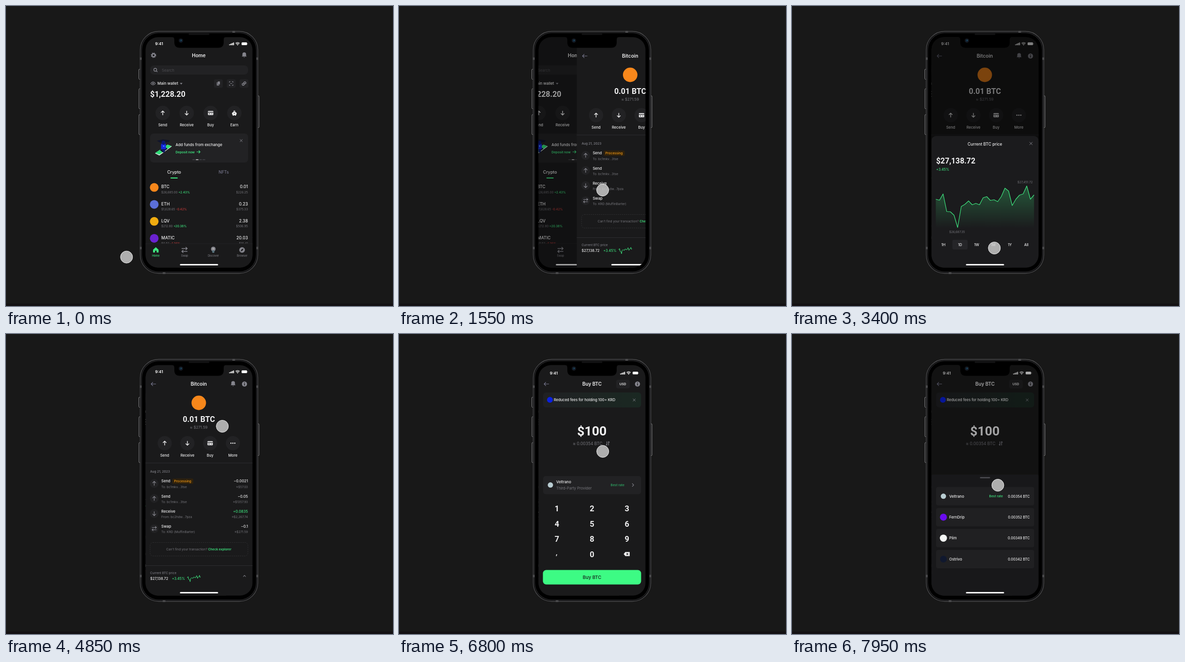
Animation, 800 px wide and 621 px high, one loop 8000 ms. Source, as an HTML page:

```html
<!DOCTYPE html>
<html lang="en">
<head>
<meta charset="utf-8">
<title>Wallet walkthrough</title>
<style>
html, body { margin: 0; height: 100%; overflow: hidden; background: #181818; }
svg { display: block; width: 100vw; height: 100vh; }
text { font-family: Inter, Roboto, sans-serif; white-space: pre; }
.big { font-family: Roboto, "Noto Sans", sans-serif; }
</style>
</head>
<body>
<svg id="stage" viewBox="0 0 800 621"></svg>
<script>
const WHITE = '#f0f0f1', GREY = '#76767c', MID = '#85858d', GREEN = '#3ee67f', CARD = '#222224', PAGE = '#1a1a1b';

// Drawing helpers
const rect = (x, y, w, h, r = 0, fill = CARD, more = '') =>
  `<rect x="${x}" y="${y}" width="${w}" height="${h}" rx="${r}" fill="${fill}" ${more}/>`;
const dot = (x, y, r, fill = CARD, more = '') => `<circle cx="${x}" cy="${y}" r="${r}" fill="${fill}" ${more}/>`;
const line = (d, color = MID, w = 1, more = '') =>
  `<path d="${d}" fill="none" stroke="${color}" stroke-width="${w}" stroke-linejoin="round" ${more}/>`;
const shape = (d, fill) => `<path d="${d}" fill="${fill}"/>`;
const text = (x, y, s, size = 7.7, fill = WHITE, weight = 500, anchor = 'start') =>
  `<text class="${size > 14 ? 'big' : ''}" x="${x}" y="${y}" font-size="${size}" fill="${fill}" font-weight="${weight}" text-anchor="${anchor}">${s}</text>`;
const mid = (x, y, s, size, fill, weight) => text(x, y, s, size, fill, weight, 'middle');
const end = (x, y, s, size, fill, weight) => text(x, y, s, size, fill, weight, 'end');
const span = (s, fill, weight = 500) => `<tspan fill="${fill}" font-weight="${weight}">${s}</tspan>`;
const group = (id, body) => `<g id="${id}">${body}</g>`;

// Icons
const up = (x, y, c = WHITE, w = 1.4) => line(`M${x} ${y + 4.5}v-8.5m-3.6 3.3l3.6-3.6 3.6 3.6`, c, w);
const down = (x, y, c = WHITE, w = 1.4) => line(`M${x} ${y - 4.5}v8.5m-3.6-3.3l3.6 3.6 3.6-3.6`, c, w);
const swap = (x, y, c = MID, k = 1) =>
  `<g transform="translate(${x} ${y}) scale(${k})">${line('M-5-2.5H4M2-5L4.7-2.5 2 0M5 2.5H-4M-2 0L-4.7 2.5-2 5', c, 1.2)}</g>`;
const cross = (x, y, s = 2.6) => line(`M${x - s} ${y - s}l${2 * s} ${2 * s}m0 ${-2 * s}l${-2 * s} ${2 * s}`, MID, 1);
const card = (x, y) => rect(x - 5.5, y - 4.2, 11, 8.4, 1, WHITE) + rect(x - 5.5, y - 2.2, 11, 1.5, 0, CARD) +
  rect(x - 3.8, y + 1, 3, 1.3, 0, CARD) + rect(x + 1.5, y + 1, 2, 1.3, 0, CARD);
const more = (x, y) => [-4, 0, 4].map(d => dot(x + d, y, 1.3, WHITE)).join('');
const pig = (x, y) => dot(x, y - 3.5, 1.8, WHITE) +
  shape(`M${x - 5} ${y + 1}q1-3.5 5-3.5t5 3.5l-1 2.5-1 2h-2v-1h-2v1h-2l-1-2z`, WHITE) + dot(x, y - 3.5, .7, CARD) + dot(x, y + .8, .9, CARD);
const bell = (x, y) => shape(`M${x - 5} ${y + 3}l1.2-1.6v-3a3.8 3.8 0 0 1 7.6 0v3l1.2 1.6zM${x - 1.5} ${y + 4}h3q-1.5 2.2-3 0z`, MID);
const info = (x, y) => dot(x, y, 5.3, MID) + rect(x - .8, y - .7, 1.6, 3.6, 0, PAGE) + dot(x, y - 2.4, .9, PAGE);
const back = y => line(`M310 ${y}h-10m3.8-3.8l-3.8 3.8 3.8 3.8`, '#74748a', 1.2);
const bar = rect(359.5, 533.9, 79, 3, 1.5, '#f4f4f4');
const page = rect(288, 64, 222, 478, 0, PAGE);
const dim = id => rect(288, 64, 222, 478, 0, '#000', `id="${id}" opacity="0"`);

const status = (dx = 0, dy = 0) => mid(316.5 + dx, 81.3 + dy, '9:41', 8.2, '#fff', 600) +
  `<g transform="translate(${-dx * 1.15} ${dy})">` +
  [0, 1, 2, 3].map(i => rect(461.3 + i * 2.7, 79.2 - i * 1.2, 1.9, 2 + i * 1.2, .4, '#fff')).join('') +
  line('M474.6 77.2q4.1-3.4 8.2 0M476 79q2.7-2.1 5.4 0', '#fff', 1.2) + dot(478.7, 80.4, 1, '#fff') +
  rect(487, 75.3, 11.3, 5.7, 1.6, '#fff') + rect(499, 77.2, .7, 2, .3, '#999') + '</g>';

const actions = (xs, y, names, icons, r) => xs.map((x, i) =>
  dot(x, y, r) + icons[i](x, y) + mid(x, y + 27.8, names[i], 7.6)).join('');

// Home screen
const coins = [
  ['BTC', '$26,685.00', '+2.43%', '0.01', '$226.25', '#f7871b'],
  ['ETH', '$1,628.65', '-0.42%', '0.23', '$375.33', '#5b6fd8'],
  ['LQV', '$212.80', '+20.38%', '2.38', '$506.95', '#f0ac10'],
  ['MATIC', '$0.52', '-1.36%', '20.03', '$10.41', '#6a22d0']
];
const coinRows = coins.map(([name, price, change, amount, value, color], i) => {
  const y = 375.6 + i * 35.1;
  return dot(306.4, y, 9, color) + text(321, y + 1.8, name, 8.7) +
    text(321, y + 12.6, price + ' ' + span(change, change[0] == '+' ? GREEN : '#c23a3a'), 6.2, GREY, 400) +
    end(500, y + 1.8, amount, 8.5) + end(500, y + 12.6, value, 6.2, GREY, 400);
}).join('');

const gear = dot(305, 102, 3.2, 'none', `stroke="${MID}" stroke-width="2.4"`) +
  dot(305, 102, 4.8, 'none', `stroke="${MID}" stroke-width="1.6" stroke-dasharray="1.9 1.87"`);
const tools = [439, 465.5, 492].map(x => rect(x - 9, 151.8, 18, 17.4, 3)).join('') +
  rect(435.7, 158, 5, 6.5, .6, MID) + rect(437.5, 156, 5, 6.5, .6, MID, `stroke="${CARD}" stroke-width=".6"`) +
  line('M461.8 158.5v-2h2m3.4 0h2v2m0 4v2h-2m-3.4 0h-2v-2M463.5 160.5h4', MID, 1.1) +
  dot(490.3, 162, 2.1, 'none', `stroke="${MID}" stroke-width="1.5"`) + dot(493.8, 159, 2.1, 'none', `stroke="${MID}" stroke-width="1.5"`);
const art = shape('M308 305l26-18 9 3.5-26 19z', '#dfe6e8') + shape('M308.5 304l25.5-17 8 3-25 17.5z', '#2fdc77') +
  shape('M318 298l10-6.5 6 4-10 7.5z', '#0d1030') +
  shape('M312 279l12-3 15 2-3 4-17 1z', '#10142c') +
  rect(320.5, 284, 10, 14, 4, '#1426e0') + dot(325.5, 283, 4, '#0c1670') + shape('M322 296h7l-1 7h-3z', '#101a6a') + dot(326, 290, 1.3, '#4fa8f0');
const nav = rect(288, 492, 222, 50, 0, PAGE) + line('M288 492h222', '#232325') +
  shape('M304 504.5l5.7-5.2 5.7 5.2v5.7h-4v-3.6h-3.4v3.6h-4z', GREEN) + swap(369, 505, MID, 1.2) +
  dot(428.5, 503, 4.8, MID) + shape('M425.7 506h5.6l-1 5h-3.6z', '#56707a') + dot(428.5, 502.5, 2, '#aaa') +
  dot(488, 505, 5.8, MID) + shape('M485 508l1.8-4.2 4.2-1.8-1.8 4.2z', PAGE) +
  ['Home', 'Swap', 'Discover', 'Browser'].map((s, i) => mid(309.7 + i * 59.5, 519.4, s, 5.5, i ? GREY : GREEN)).join('');

const home = page + status() + gear + bell(492.5, 101.5) + mid(398.5, 106.2, 'Home', 10, WHITE, 600) +
  rect(298, 123, 202.5, 19, 8) + dot(308.5, 132, 3, 'none', `stroke="${MID}" stroke-width="1.3"`) + line('M310.7 134.3l2.3 2.3', MID, 1.4) +
  text(322, 135.6, 'Search', 7.8, '#4b4b4f', 400) +
  line('M299.3 160.3q4.7-6.4 9.4 0q-4.7 6.4-9.4 0z', MID, 1.1) + dot(304, 160.3, 1.6, MID) +
  text(313, 163.2, 'Main wallet', 7.9) + shape('M359.5 159.2h5.4l-2.7 3.4z', MID) + tools +
  text(298, 187.7, '$1,228.20', 16, WHITE, 600) +
  actions([324, 373.5, 423, 472], 221.5, ['Send', 'Receive', 'Buy', 'Earn'], [up, down, card, pig], 15) +
  rect(298, 264, 202.5, 60, 7) + art + text(350.5, 290.3, 'Add funds from exchange', 7.8) +
  text(350.5, 305, 'Deposit now', 6.6, GREEN, 600) + line('M394 302h7.2m-2.8-2.8l2.8 2.8-2.8 2.8', GREEN, 1.2) + cross(486.2, 278.6) +
  [0, 1, 2, 3].map(i => rect(385.3 + i * 7, 317.5, 5.6, 1.2, .5, i == 1 ? '#eee' : '#4a4a50')).join('') +
  mid(347.5, 347.3, 'Crypto', 8.8) + mid(450, 347.3, 'NFTs', 8.6, '#74748a') + rect(340, 355, 15, 2, 1, GREEN) +
  coinRows + nav + bar + dim('homeDim');

// Coin screen
const moves = [
  [up, 'Send', 'To: bc1mkv...3tse', '−0.0021', '≈$57.03'],
  [up, 'Send', 'To: bc1mkv...3tse', '−0.05', '≈$1357.93'],
  [down, 'Receive', 'From: bc2hdw...7pza', '+0.0835', '≈$2,267.74'],
  [swap, 'Swap', 'To: KRD (MuffinBarter)', '−0.1', '≈$271.59']
];
const moveRows = moves.map(([icon, name, who, amount, value], i) => {
  const y = 307.3 + i * 31.2;
  return dot(306.4, y + 2, 9) + icon(306.4, y + 2, MID, icon == swap ? .95 : 1.2) + text(321, y, name, 7.7) +
    text(321, y + 11.3, who, 6.5, GREY, 400) +
    end(500, y, amount, 7.5, amount[0] == '+' ? GREEN : WHITE) + end(500, y + 11.3, value, 6.3, GREY, 400);
}).join('');

const prices = [400, 402, 389, 425.5, 426, 433, 458.5, 415, 410.5, 403.5, 411.5, 408.5, 411.5, 397, 394.5,
  402.5, 401, 405, 394.5, 377, 383, 413, 400, 391.5, 389, 372.5, 400, 391];
const curve = (x, y, kx, ky) => 'M' + prices.map((p, i) => `${(x + i * kx).toFixed(2)} ${(y + (p - 372) * ky).toFixed(2)}`).join('L');

const coin = page + status() + back(103.5) + mid(398.5, 107.3, 'Bitcoin', 10.1, WHITE, 600) +
  bell(469.5, 103) + info(493, 103.5) + dot(398.5, 142.5, 15, '#f7871b') +
  mid(398.7, 181.8, '0.01 BTC', 16, WHITE, 600) + mid(398.5, 196.4, '≈ $271.59', 7.8, GREY, 400) +
  actions([328, 375, 422, 469], 226, ['Send', 'Receive', 'Buy', 'More'], [up, down, card, more], 14.7) +
  line('M288 267h222', '#2d2d30') + text(298, 287, 'Aug 21, 2023', 6.5, MID) + moveRows +
  rect(344, 299.3, 43, 11, 2, '#30220d') + mid(365.2, 307.2, 'Processing', 6.7, '#f59a13') +
  rect(298, 431.5, 202, 28, 6, 'none', 'stroke="#343437" stroke-width=".8" stroke-dasharray="2.5 1.8"') +
  mid(398.5, 448.3, "Can't find your transaction? " + span('Check explorer', GREEN, 600), 6.5, GREY, 400) +
  line('M288 479.5h222', '#2d2d30') + text(298, 496.5, 'Current BTC price', 6.4, MID, 400) +
  text(298, 509.4, '$27,138.72', 7.4) + text(343, 509.4, '+3.45%', 7.1, GREEN) +
  line(curve(374.5, 499.5, 1.02, .155), GREEN, 1) + line('M490.3 502.5l2.7-2.9 2.7 2.9', MID, 1.1) + bar + dim('coinDim');

const chart = curve(297.3, 372, 7.52, 1);
const priceSheet = rect(288, 269, 222, 290, 10, '#1b1b1d') + mid(398.7, 288.5, 'Current BTC price', 8.4) + cross(494, 284.6, 3) +
  text(298, 326.2, '$27,138.72', 15.8, WHITE, 600) + text(298, 340.7, '+3.45%', 7.1, GREEN) +
  end(497.5, 366.5, '$27,451.72', 6.2, GREY, 400) + text(325, 470.3, '$26,687.35', 6.2, GREY, 400) +
  shape(chart + 'V460H297.3z', 'url(#glow)') + line(chart, GREEN, 1.2) + rect(331.5, 484, 31.5, 20, 3, '#252528') +
  ['1H', '1D', '1W', '1M', '1Y', 'All'].map((s, i) => mid(313 + i * 34.3, 497, s, 7.3)).join('') + bar;

// Buy screen
const keys = [...'123456789,0'].map((k, i) => {
  const x = 326.5 + i % 3 * 72.4, y = 366.9 + (i / 3 | 0) * 31.6;
  return k == ',' ? mid(x - .5, y - 5, k, 13, WHITE, 700) : mid(x, y, k, 16.4, WHITE, 600);
}).join('');

const buy = page + status(3.5, 2.6) + back(103.5) + mid(399, 107.4, 'Buy BTC', 9.8, WHITE, 600) +
  rect(449, 94.7, 28, 18, 4) + mid(462.7, 106, 'USD', 6.5, WHITE, 600) + info(493, 103.5) +
  rect(298, 121, 202.5, 31, 6, 'url(#mint)') + dot(312, 136.3, 6, '#0a20e0') +
  text(320, 139.4, 'Reduced fees for holding 100+ KRD', 7.5) + cross(486.2, 136.6) +
  mid(398.7, 209.5, '$100', 26.6, WHITE, 600) + mid(390, 229.8, '≈ 0.00354 BTC', 8.5, GREY, 400) +
  line('M429.8 222.5v8m-2-2.2l2 2.2M433.2 230.5v-8m2 2.2l-2-2.2', MID, 1.2) +
  rect(298, 294, 202.5, 37.5, 5) + dot(313, 312.6, 5.5, '#b9cdd2') + text(325, 309.2, 'Veltrano', 7.7) +
  text(325, 322.2, 'Third-Party Provider', 7.6, GREY, 400) + end(466, 315.4, 'Best rate', 6.7, '#2fae66') +
  line('M482 309.4l3.2 3.2-3.2 3.2', MID, 1.2) + keys +
  shape('M464.5 455.5l3.4-4.2h9v8.4h-9z', WHITE) + line('M470.2 453.7l3.6 3.6m0-3.6l-3.6 3.6', PAGE, 1.1) +
  rect(297.5, 488.5, 203, 30, 7, '#3dfb84') + mid(399, 507, 'Buy BTC', 9.5, '#14201a') + dim('buyDim');

const offers = [
  ['Veltrano', 354, '#b9cdd2', 5.5], ['FernDrip', 352, '#6a0cf0', 7.2], ['Plim', 349, '#f4f6f5', 7.4], ['Ostrivo', 342, '#10182e', 7]
];
const offerSheet = rect(288, 291, 222, 270, 3, '#18181a') + rect(388.5, 296, 21, 2.8, 1.4, '#48484d') +
  offers.map(([name, rate, color, r], i) => {
    const y = 335.8 + i * 43.4;
    return rect(298, y - 19, 202.5, 38, 4, '#202022') + dot(313, y, r, color) + text(325, y + 2.8, name, 7.7) +
      (i ? '' : end(436, y + 2.6, 'Best rate', 6.7, GREEN)) + end(491.5, y + 2.7, `0.00${rate} BTC`, 7.2);
  }).join('') + bar;

// Phone body
const edge = '#4c4c4e', rim = 'stroke="#858587"';
const frame = rect(274.5, 131, 3, 20.5, 1, '#111', rim) + rect(274.8, 171.5, 3, 41, 1, '#111', rim) +
  rect(274.8, 225, 3, 41, 1, '#111', rim) + rect(520, 186, 3, 65.5, 1, '#111', rim) +
  rect(277.5, 52.5, 243, 501, 38, '#111112', `stroke="${edge}" stroke-width="1.3"`) +
  rect(280.5, 55.5, 237, 495, 35.5, '#000', 'stroke="#38383a" stroke-width=".8"') +
  [106.5, 498.5].map(y => rect(276.5, y, 3.5, 5, 0, edge) + rect(518, y, 3.5, 5, 0, edge)).join('') +
  rect(468, 51.5, 5.5, 3.5, 0, edge) + rect(324, 551.3, 5.5, 3.5, 0, edge);
const notch = shape('M343 64q5 0 5 6v5q0 11.5 11.5 11.5h79q11.5 0 11.5-11.5v-5q0-6 5-6z', '#000') +
  rect(377.5, 56.8, 43, 3.2, 1.6, '#121213') + dot(361.5, 71.6, 4.6, '#13161c') + dot(361.5, 71.6, 2.6, '#12283c') + dot(362.3, 70.8, .9, '#2f6a74');

const stage = document.getElementById('stage');
stage.innerHTML = `<defs>
  <clipPath id="screen"><rect x="288.5" y="64.5" width="221" height="477" rx="26"/></clipPath>
  <linearGradient id="glow" x2="0" y2="1"><stop stop-color="#3ee67f" stop-opacity=".3"/><stop offset="1" stop-color="#3ee67f" stop-opacity="0"/></linearGradient>
  <linearGradient id="mint"><stop stop-color="#202123"/><stop offset="1" stop-color="#1a2822"/></linearGradient>
</defs>` + rect(0, 0, 800, 621, 0, '#181818') + rect(0, 616, 800, 5, 0, '#131113') + frame +
  `<g clip-path="url(#screen)">${group('home', home)}${group('coin', coin)}${group('priceSheet', priceSheet)}${group('buy', buy)}${group('offerSheet', offerSheet)}</g>` +
  notch + dot(0, 0, 12.5, '#ccc', 'id="cursor" fill-opacity=".83" stroke="#ececec" stroke-width="1"');

// Motion
const ease = (t, start, length) => {
  const p = Math.min(1, Math.max(0, (t - start) / length));
  return p * p * (3 - 2 * p);
};
const move = (id, x, y) => document.getElementById(id).setAttribute('transform', `translate(${x} ${y})`);
const shade = (id, a) => document.getElementById(id).setAttribute('opacity', a);
const legs = [[380, 421, 381], [2140, 418.3, 501], [3580, 447.2, 191], [5050, 420.5, 232], [6616, 425.5, 313]];

function draw() {
  const t = performance.now() % 8000;
  const toCoin = ease(t, 1283, 450), toBuy = ease(t, 5900, 450);
  const price = t < 4800 ? ease(t, 2965, 430) : 0, offer = ease(t, 7425, 430);
  move('home', -55 * toCoin, 0);
  move('coin', 221.5 * (1 - toCoin) - 55 * toBuy, 0);
  move('buy', 221.5 * (1 - toBuy), 0);
  move('priceSheet', 0, 274 * (1 - price));
  move('offerSheet', 0, 252 * (1 - offer));
  shade('homeDim', .55 * toCoin);
  shade('coinDim', .5 * price + .55 * toBuy);
  shade('buyDim', .32 * offer);
  let x = 249.2, y = 519.7;
  for (const [start, tx, ty] of legs) {
    const p = ease(t, start, 800);
    x += (tx - x) * p;
    y += (ty - y) * p;
  }
  move('cursor', x, y);
  requestAnimationFrame(draw);
}
draw();
</script>
</body>
</html>
```
